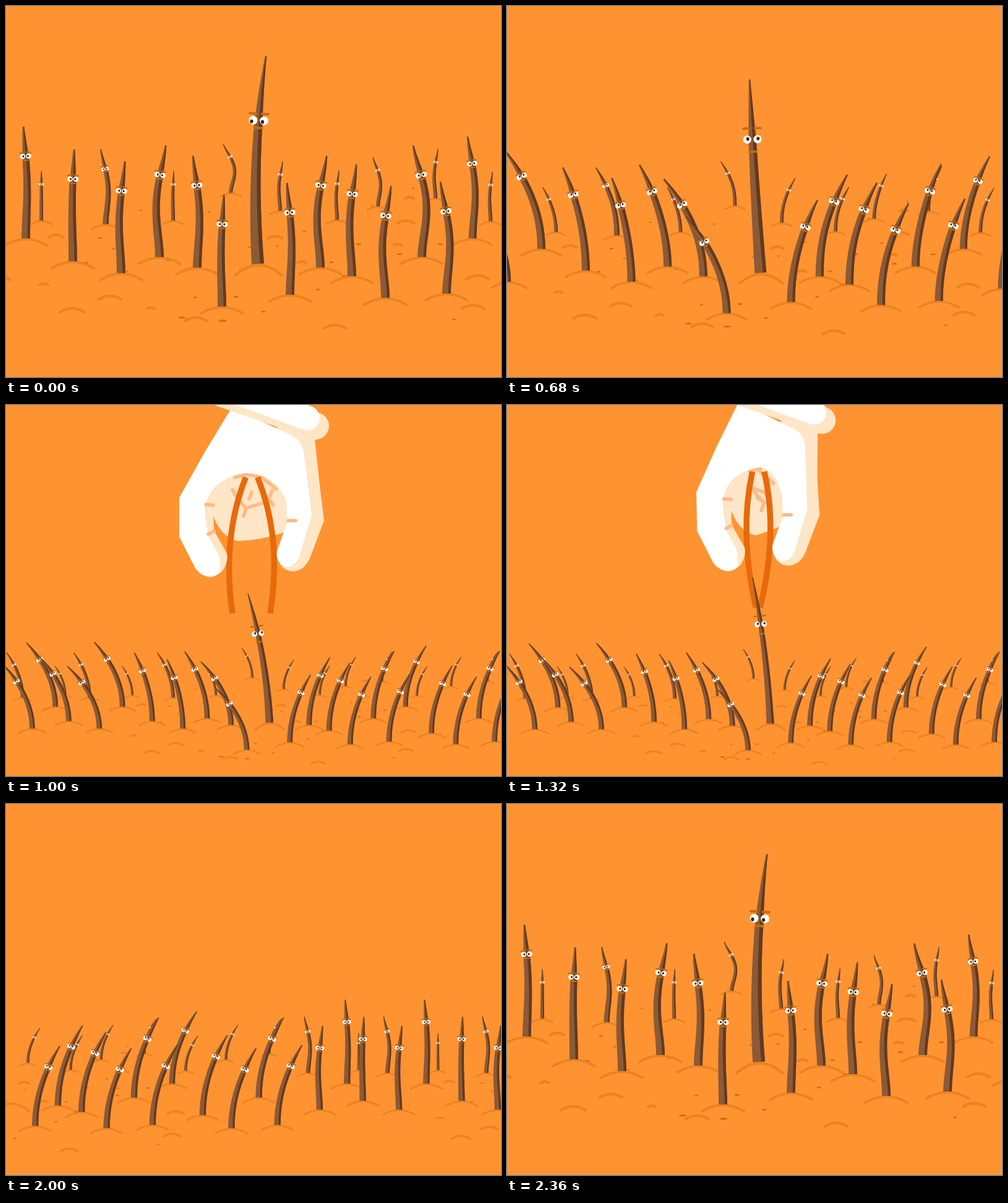
Animation, 800 px wide and 600 px high, one loop 2440 ms. Source, as an HTML page with a canvas:

```html
<!DOCTYPE html>
<html lang="en">
<head>
<meta charset="utf-8">
<title>Pluck</title>
<style>
html, body { margin: 0; width: 100%; height: 100%; overflow: hidden; background: #ff9331; }
canvas { display: block; width: 800px; height: 600px; }
</style>
</head>
<body>
<canvas id="stage" width="800" height="600"></canvas>
<script>
const ctx = document.getElementById('stage').getContext('2d');
const LOOP = 2440, STEP = 40, PERIOD = 1270, TALL = 181, SHORT = 80;
const FAR = { s: 0.63, x: 169.5, y: 252 };
const HERO = { x: 407, y: 417 };
const C = {
  bg: '#ff9331', mound: '#ea8320', spot: '#ce6c12', hair: '#8b5a37', shade: '#63391f',
  brow: '#c56c0c', pupil: '#3a2012', skin: '#fff', cream: '#ffe6c6', crease: '#fdbb86', steel: '#e8690a'
};

const clamp = k => Math.max(0, Math.min(1, k));
const lerp = (a, b, k) => a + (b - a) * k;
const ease = (t, a, b) => (1 - Math.cos(Math.PI * clamp((t - a) / (b - a)))) / 2;
const mix = (a, b, k) => Object.fromEntries(Object.keys(a).map(n => [n, lerp(a[n], b[n], k)]));
const random = n => { const v = Math.sin(n * 12.9898) * 43758.5453; return v - Math.floor(v); };

// x, y, tip offset, sway [, length]
const hair = ([x, y, tip, sway, len = TALL]) => ({ x, y, tip, sway, len, size: len / TALL });
const shift = (list, by) => list.map(h => ({ ...h, x: h.x + by }));

const edge = [[32, 376, -4, -76], [57, 347, 0, 13, SHORT]].map(hair);
const left = [[108, 413, 2, 15], [186, 432, 6, 39], [161, 353, -8, -44, 122]].map(hair);
const middle = [
  [248, 406, 10, 19], [309, 423, -7, -74], [349, 486, 3, 12], [459, 467, -5, 78], [508, 423, 10, 8],
  [559, 437, 7, 42], [754, 376, -8, 58, 165], [820, 444, 0, 20], [270, 347, 1, 8, SHORT],
  [363, 302, -12, -25, SHORT], [443, 331, 4, 8, SHORT], [535, 346, 3, -5, SHORT], [783, 348, 3, 13, SHORT]
].map(hair);
const right = [
  [613, 472, 9, 68], [672, 406, -14, 69], [712, 465, -10, -6], [601, 324, -8, -6, SHORT], [694, 311, 4, 22, SHORT]
].map(hair);
const left2 = shift(left, -213);
const CROWD = [
  ...edge, ...left, ...middle, ...right, ...left2, ...shift(right, 269),
  ...shift([...edge, ...left2.slice(1)], -171), { ...HERO, hero: true }
].sort((a, b) => a.y - b.y);

// x, top, half width
const FOLDS = [
  [81, 370, 11], [61, 449, 7], [107, 489, 20], [168, 469, 18], [234, 488, 6], [307, 504, 18],
  [435, 372, 11], [478, 413, 7], [532, 516, 18], [633, 385, 6], [646, 347, 14], [652, 309, 7],
  [762, 436, 18], [755, 484, 18]
];
const SPOTS = Array.from({ length: 28 }, (_, i) => {
  const depth = random(i + 3);
  return { x: 130 + 22 * i, y: 295 + 215 * depth, r: 2 + 6 * depth * random(i + 70) };
});

const STAND = { root: 417, tipX: 420, tipY: 81, bend: -12, brow: -11, mouth: 12, pull: 0, px: -2.5, py: 2 };
const GLANCE = { ...STAND, px: 2.5, py: 3 };
const ALERT = { ...STAND, tipX: 388, tipY: 86, bend: -1.5, brow: -19, mouth: 21, px: 1, py: -1 };
const COWER = { ...ALERT, tipX: 352, tipY: 88, bend: 13.5, px: 2, py: -2 };
const STRAIN = { ...STAND, root: 510, tipX: 394.4, tipY: -130, bend: 0, brow: -29, mouth: 38, pull: 1, px: 0, py: 0 };

function line(width, color, ...pts) {
  ctx.beginPath();
  for (let i = 0; i < pts.length; i += 2) ctx.lineTo(pts[i], pts[i + 1]);
  ctx.lineWidth = width;
  ctx.strokeStyle = color;
  ctx.stroke();
}

function oval(x, y, rx, ry, color) {
  ctx.beginPath();
  ctx.ellipse(x, y, rx, ry, 0, 0, 7);
  ctx.fillStyle = color;
  ctx.fill();
}

function arc(x, y, half, drop, width) {
  ctx.beginPath();
  ctx.moveTo(x - half, y + drop);
  ctx.quadraticCurveTo(x, y - drop, x + half, y + drop);
  ctx.lineWidth = width;
  ctx.strokeStyle = C.mound;
  ctx.stroke();
}

function slope(at, u) {
  const [x0, y0] = at(u - 0.01), [x1, y1] = at(u + 0.01);
  return Math.atan2(x1 - x0, y0 - y1);
}

function ribbon(at, width, n) {
  const rows = [];
  for (let i = 0; i <= n; i++) {
    const u = i / n, a = slope(at, u), w = width(u);
    rows.push({ u, p: at(u), nx: Math.cos(a) * w, ny: Math.sin(a) * w });
  }
  const band = (from, color) => {
    ctx.beginPath();
    for (const { u, p, nx, ny } of rows) ctx.lineTo(p[0] + nx * from(u), p[1] + ny * from(u));
    for (const { p, nx, ny } of [...rows].reverse()) ctx.lineTo(p[0] + nx / 2, p[1] + ny / 2);
    ctx.fillStyle = color;
    ctx.fill();
  };
  band(() => -0.5, C.hair);
  band(u => 0.2 * (1 - u), C.shade);
}

function face([x, y], angle, f) {
  ctx.save();
  ctx.translate(x, y);
  ctx.rotate(angle);
  ctx.scale(f.size, f.size);
  for (const side of [-1, 1]) {
    const ex = side * f.gap;
    oval(ex, 0, lerp(f.r, 6, f.pull), lerp(f.r, 10.5, f.pull), C.skin);
    oval(ex + f.px - side * (f.cross + 2 * f.pull), f.py, 2.6, 3, C.pupil);
    const bx = side * lerp(f.gap + 1, 8, f.pull);
    line(4, C.brow, bx - 5, f.brow + f.tilt * side, bx + 5, f.brow - f.tilt * side);
  }
  if (f.pull < 0.5) {
    line(4, C.brow, -6, f.mouth, 6, f.mouth);
  } else {
    ctx.beginPath();
    ctx.moveTo(-9, f.mouth + 7);
    ctx.bezierCurveTo(-10, f.mouth - 11, 10, f.mouth - 11, 9, f.mouth + 7);
    ctx.quadraticCurveTo(0, f.mouth + 4, -9, f.mouth + 7);
    ctx.fillStyle = C.skin;
    ctx.fill();
  }
  ctx.restore();
}

// How far a tip leans away from the hero, in a wave along the left side
function leanOf({ x, len }) {
  if (len < 150) return len * 0.33 * Math.sign(x - HERO.x);
  return x > HERO.x ? 53 : -60 - 22 * Math.cos((Math.max(x, -80) - 349) / 60);
}

function drawHair(h, sway, away) {
  const { x, y, size } = h, m = Math.max(size, 0.5), lean = leanOf(h);
  arc(x, y + 1, 34 * m, 10 * m, Math.max(3, 4 * m));
  const dx = h.tip + sway * h.sway + away * (lean - h.tip);
  const dy = Math.sqrt(h.len * h.len - 1.1 * dx * dx);
  const wig = -0.75 * h.tip * (1 - sway) * (1 - away) * 16;
  const at = u => [x + dx * u * u + wig * (u * (1 - u)) ** 2, y - dy * u];
  ribbon(at, u => size * (u < 0.7 ? 14 - 4.3 * u : 11 - 28 * (u - 0.7)), 20);
  face(at(0.735), slope(at, 0.735) * 0.85, {
    size: 0.6 * size, gap: 8, r: 7.2, brow: -10, mouth: 11, tilt: -1, pull: 0,
    cross: 2, px: -away * Math.sign(lean), py: -2.5 * away
  });
}

function heroPose(t) {
  let p = mix(STAND, GLANCE, ease(t, 120, 260));
  p = mix(p, ALERT, ease(t, 520, 660));
  p = mix(p, COWER, ease(t, 700, 960));
  p = mix(p, STRAIN, ease(t, 1200, 1600));
  const lift = 0.0328 * Math.max(0, t - 1600) ** 2;
  const at = u => [
    lerp(HERO.x, p.tipX, u) + 3 * p.bend * u * (1 - u),
    lerp(p.root, p.tipY, u) - lift
  ];
  return { ...p, at };
}

function heroWidth(u, pull) {
  const neck = 13.2 - 2.5 * pull;
  const w = u < 0.68 ? neck + 10 * (0.68 - u) : lerp(neck, 2.5, (u - 0.68) / 0.32);
  if (u > 0.14) return w;
  const bulb = u < 0.055 ? 34 * Math.sqrt(1 - (1 - u / 0.055) ** 2) : lerp(34, 16.5, ease(u, 0.055, 0.14));
  return lerp(w, bulb, pull * pull);
}

function drawHero(t) {
  arc(408, 419, 37, 16, 4.5);
  if (t > 1640 && t < 1770) {
    const r = lerp(14, 20, clamp((t - 1640) / 60));
    for (let i = -2; i <= 2; i++) {
      const s = Math.sin(i * 0.62), c = Math.cos(i * 0.62);
      line(4.5, C.skin, 405 + s * r, 417 - c * r, 405 + s * (r + 6), 417 - c * (r + 6));
    }
  }
  if (t > 1790) return;
  const p = heroPose(t);
  ctx.save();
  if (t > 1200) {
    ctx.beginPath();
    ctx.rect(-1000, -3000, 4000, 3418);
    ctx.clip();
  }
  ribbon(p.at, u => heroWidth(u, p.pull), 80);
  const eyes = lerp(0.69, 0.717, p.pull);
  face(p.at(eyes), slope(p.at, eyes) * 0.7, { ...p, size: 1, gap: 8.8, r: 7, tilt: 0, cross: 0 });
  ctx.restore();
}

function drawWorld(t, cam) {
  ctx.setTransform(cam.s, 0, 0, cam.s, cam.x, cam.y);
  for (const { x, y, r } of SPOTS) oval(x, y, r, 0.8 + r * 0.15, C.spot);
  for (const [x, y, half] of FOLDS) arc(x, y, half, half * 0.3, 4.5);
  const sway = ease(t, 20, 320) * (1 - ease(t, 400, 610));
  const away = ease(t, 500, 737);
  for (const h of CROWD) h.hero ? drawHero(t) : drawHair(h, sway, away);
}

function drawHand(ox, oy, squeeze) {
  ctx.setTransform(1, 0, 0, 1, ox, oy);
  const bend = (x, y) => [x + squeeze * 18 * (x < 397 ? 1 : -1) * clamp(y / 160), y];
  // Two numbers make a line, four a curve
  const shape = (color, ...segs) => {
    ctx.beginPath();
    for (const [a, b, c, d] of segs) {
      if (c === undefined) ctx.lineTo(...bend(a, b));
      else ctx.quadraticCurveTo(...bend(a, b), ...bend(c, d));
    }
    ctx.fillStyle = color;
    ctx.fill();
  };
  const crease = (...pts) => {
    const out = [];
    for (let i = 0; i < pts.length; i += 2) out.push(...bend(pts[i], pts[i + 1]));
    line(5.5, C.crease, ...out);
  };

  shape(C.cream, [322, 158], [334, 176], [345, 212, 374, 220], [420, 218, 457, 203], [457, 150],
    [440, 108, 390, 108], [345, 112, 322, 158]);
  crease(370, 117, 388, 112, 412, 116, 437, 136);
  crease(397, 141, 393, 152);
  crease(366, 137, 375, 152, 388, 167, 413, 159);
  crease(388, 167, 384, 180);
  crease(430, 138, 425, 152, 432, 162);

  ctx.lineCap = 'butt';
  for (const side of [-1, 1]) {
    ctx.beginPath();
    ctx.moveTo(397 + side * 9.5, 117);
    ctx.quadraticCurveTo(397.5 + side * (49 - 17 * squeeze), 215, 396.5 + side * (30.5 - 27 * squeeze), 337);
    ctx.lineWidth = 9.5;
    ctx.strokeStyle = C.steel;
    ctx.stroke();
  }
  ctx.lineCap = 'round';

  shape(C.cream, [430, 10], [498, 45], [507, 130], [514, 187], [491, 248], [482, 268, 464, 269],
    [445, 268, 440, 250], [470, 150]);
  shape(C.skin, [365, 4], [322, 75], [305, 105, 280, 150], [280, 213], [306, 264], [316, 278, 332, 278],
    [352, 274, 357, 250], [335, 205], [323, 185], [322, 160], [340, 115, 388, 110], [436, 112, 453, 155],
    [455, 190], [449, 205, 438, 236], [435, 254, 452, 262], [468, 262, 474, 245], [494, 178],
    [481, 75], [477, 56, 460, 48], [372, 8]);
  shape(C.cream, [322, 160], [335, 172], [336, 203], [357, 240], [360, 258, 346, 272],
    [347, 256, 344, 243], [326, 210], [323, 185]);
  crease(323, 161, 335, 162);
  crease(327, 209, 336, 204);
  crease(456, 187, 468, 187);

  line(44, C.cream, 340, -22, 500, 34);
  line(40, C.skin, 345, -31, 487, 21);
}

function draw(t) {
  ctx.setTransform(1, 0, 0, 1, 0, 0);
  ctx.fillStyle = C.bg;
  ctx.fillRect(0, 0, 800, 600);
  ctx.lineCap = ctx.lineJoin = 'round';

  const panning = t > 1800;
  const near = panning ? ease(t, 1818, 2290) : 1 - ease(t, 562, 1030);
  const cam = { s: lerp(FAR.s, 1, near), x: FAR.x * (1 - near), y: FAR.y * (1 - near) };

  if (t > 740 && t < 1790) {
    let ox = 5.4 * ease(t, 1000, 1110);
    let oy = 11 * ease(t, 1000, 1110) - 390 * (1 - clamp((t - 740) / 260)) ** 2;
    if (t >= 1120) {
      const [x, y] = heroPose(t).at(0.804);
      ox = x * cam.s + cam.x - 396.5;
      oy = y * cam.s + cam.y - 337;
    }
    drawHand(ox, oy, ease(t, 1110, 1220));
  }
  if (panning) {
    const next = { ...cam, x: (FAR.s * PERIOD + FAR.x) * (1 - near) };
    drawWorld(t, { ...next, x: next.x - PERIOD * cam.s });
    drawWorld(0, next);
  } else {
    drawWorld(t, cam);
  }
}

const start = performance.now();
function tick() {
  const t = (performance.now() - start) % LOOP;
  draw(Math.min(Math.floor(t / STEP) * STEP, LOOP - 2 * STEP));
  requestAnimationFrame(tick);
}
tick();
</script>
</body>
</html>
```
